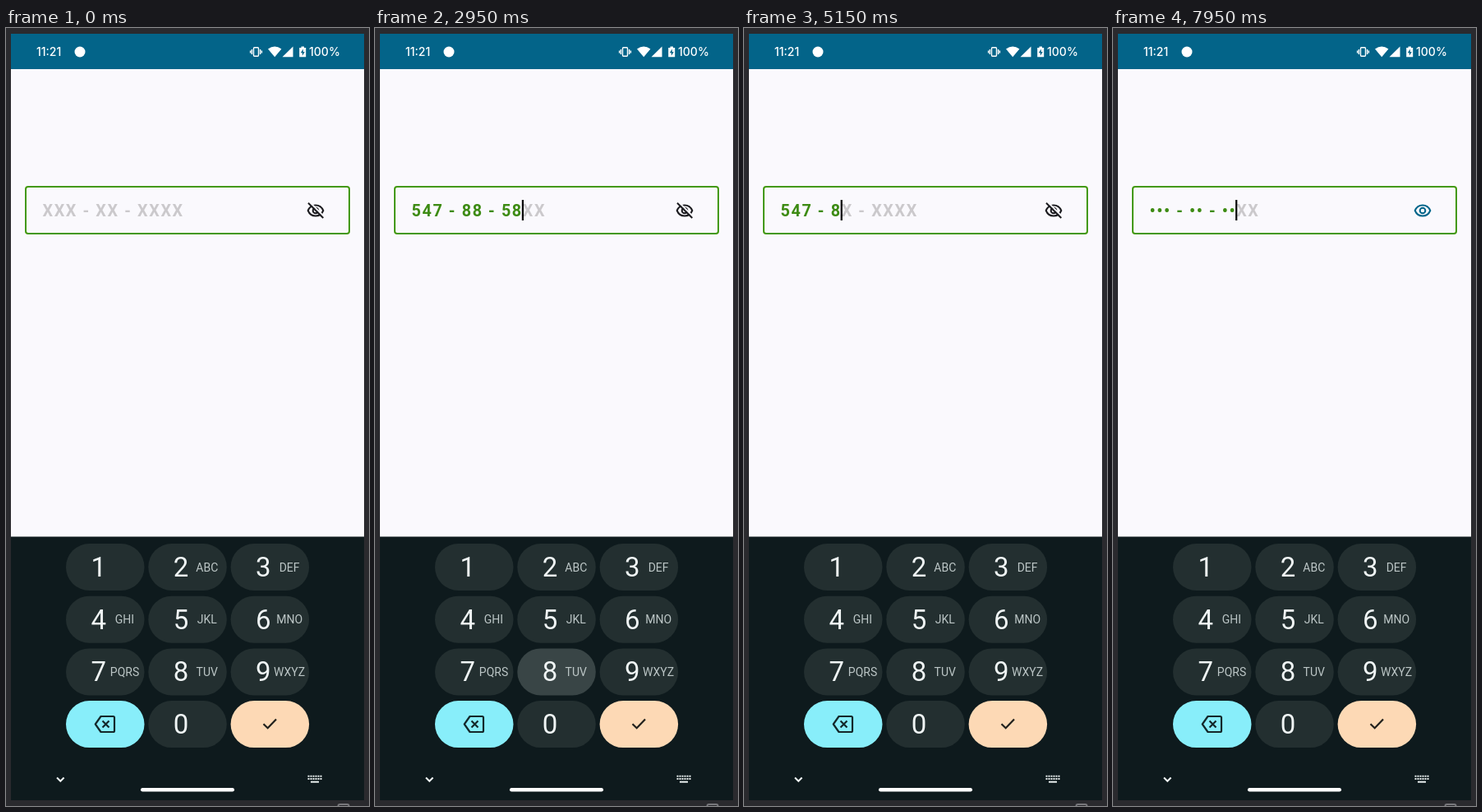
Recreate the animation shown at these times as an HTML page. Size 442 by 946 pixels, loop 8 s.

```html
<!DOCTYPE html>
<html lang="en">
<head>
<meta charset="utf-8">
<title>Masked number field</title>
<style>
  html, body { margin: 0; width: 100%; height: 100%; overflow: hidden; background: #2a2a2e; }
  svg { display: block; width: 442px; height: 946px; }
  text { font-family: Roboto, sans-serif; white-space: pre; }
  .status { font: 500 14px Inter, sans-serif; fill: #fff; }
  .field { font-size: 19.8px; font-weight: 700; letter-spacing: 1.6px; }
  .digit { font-size: 33px; fill: #f0f5f5; text-anchor: middle; }
  .letters { font-size: 14px; fill: #bcc6c6; text-anchor: middle; }
  .line { fill: none; stroke-width: 2; }
</style>
</head>
<body>
<svg viewBox="0 0 442 946">
  <rect width="442" height="946" fill="#2a2a2e"/>
  <rect x="6" y="7" width="430" height="43" fill="#036489"/>
  <rect x="6" y="50" width="430" height="569" fill="#faf9fd"/>
  <rect x="6" y="618.5" width="430" height="320.5" fill="#0e1a1d"/>
  <rect x="404.5" y="944" width="13" height="8" rx="2" class="line" stroke="#77777b"/>

  <text class="status" x="37" y="34">11:21</text>
  <circle cx="90" cy="29" r="6.5" fill="#fff"/>
  <g class="line" stroke="#fff" style="stroke-width:1.4">
    <rect x="301.5" y="23.7" width="6" height="10.6" rx="1"/>
    <path d="M299.4 26v6M309.6 26v6M297.6 27.5v3M311.4 27.5v3"/>
  </g>
  <path d="M319 25.5Q327.2 19.5 335.400 25.5L327.200 35.300ZM336.500 35.300L349.500 22.500V35.300Z" fill="#fff"/>
  <path d="M359.500 22.500h3.500v1.500h2.200v11.300h-8v-11.300h2.300z" fill="#fff"/>
  <path d="M361.800 25.500l-3 4.700h2v3.600l3-4.800h-2z" fill="#036489"/>
  <text class="status" x="369" y="34">100%</text>

  <rect x="24" y="193" width="394" height="57" rx="3" class="line" stroke="#43990f"/>
  <text class="field" x="44.500" y="229"><tspan id="typed" fill="#3d8b13"></tspan><tspan id="hint" fill="#cbc9cc"></tspan></text>
  <rect id="caret" y="209" width="2.200" height="25" fill="#000"/>

  <circle id="ripple" cx="377" cy="222" r="21" fill="#f1eff2"/>
  <g id="eye" class="line" transform="translate(377 222)">
    <path d="M-9.300 0C-7.600-4.100-4.200-6.500 0-6.500S7.600-4.100 9.300 0C7.600 4.100 4.200 6.500 0 6.500S-7.600 4.100-9.300 0Z"/>
    <circle r="3.300"/>
    <g id="slash">
      <path d="M-7.500-10.500L10.500 7.500" stroke="#faf9fd"/>
      <path d="M-9-9.300L9.300 9"/>
    </g>
  </g>

  <g id="keys"></g>
  <g class="line" stroke="#14282b" style="stroke-width:2.200">
    <path d="M115.500 837H130.500Q132 837 132 838.500V854.500Q132 856 130.500 856H115.500L108.800 846.500Z" stroke-linejoin="round"/>
    <path d="M117.500 842.500l8 8M125.500 842.500l-8 8"/>
    <path d="M313.500 846.300L318.700 851.300L329 840.500" stroke="#20201c"/>
  </g>
  <path d="M62 911.500l4.300 4.300l4.300-4.300" class="line" stroke="#f0f5f5"/>
  <path d="M367.500 909.700h17M367.500 913h17" class="line" stroke="#e8eeee" stroke-dasharray="2 1"/>
  <path d="M371 916.700h10" class="line" stroke="#e8eeee"/>
  <rect x="164" y="924" width="114" height="4.600" rx="2.300" fill="#fff"/>
</svg>
<script>
const LOOP = 8000;
const MASK = "XXX - XX - XXXX";
const DIGITS = "547885885";
const TYPED_X = 44.5;
const HIDE_AT = 6800;

// Commit times: digits added, then deleted, then added again.
const edits = [];
let size = 0;
const add = times => times.forEach(t => edits.push({ t, key: DIGITS[size], n: ++size }));
const remove = times => times.forEach(t => edits.push({ t, key: "del", n: --size }));
add([1200, 1450, 1800, 2150, 2400, 2680, 2920, 3200, 3450]);
remove([4250, 4430, 4610, 4830, 5040, 5240, 5450]);
add([6400, 7230, 7430, 7640, 7850]);

const $ = id => document.getElementById(id);
const make = (tag, attrs, label = "") => {
  const el = document.createElementNS("http://www.w3.org/2000/svg", tag);
  for (const name in attrs) el.setAttribute(name, attrs[name]);
  el.textContent = label;
  return $("keys").appendChild(el);
};

const layout = [
  ["1", ""], ["2", "ABC"], ["3", "DEF"],
  ["4", "GHI"], ["5", "JKL"], ["6", "MNO"],
  ["7", "PQRS"], ["8", "TUV"], ["9", "WXYZ"],
  ["del", ""], ["0", ""], ["ok", ""]
];
const base = { del: "#88eefa", ok: "#fdd9b5" };
const pads = {};
layout.forEach(([key, letters], i) => {
  const x = 73 + (i % 3) * 100.3;
  const y = 627 + Math.floor(i / 3) * 63.7;
  pads[key] = make("rect", { x, y, width: 95.5, height: 57, rx: 28.5 });
  if (base[key]) return;
  make("text", { class: "digit", x: x + 39.700, y: y + 40 }, key);
  make("text", { class: "letters", x: x + 71.5, y: y + 33.5 }, letters);
});

const ramp = (t, from, to) => Math.min(1, Math.max(0, (t - from) / (to - from)));

// A separator turns green only once a digit follows it.
function split(n) {
  let end = 0;
  for (let seen = 0; seen < n; end++) if (MASK[end] === "X") seen++;
  return end;
}

function render(t) {
  let n = 0, last = -600;
  for (const e of edits) if (e.t <= t) { n = e.n; last = e.t; }
  const hidden = t >= HIDE_AT;
  const end = split(n);
  let i = 0;
  $("typed").textContent = MASK.slice(0, end).replace(/X/g, () => hidden ? (i++, "•") : DIGITS[i++]);
  $("hint").textContent = MASK.slice(end);

  const width = end ? $("typed").getComputedTextLength() : 0;
  $("caret").setAttribute("x", TYPED_X + width - 1);
  $("caret").setAttribute("visibility", (t - last) % 1000 < 500 ? "visible" : "hidden");

  $("eye").setAttribute("stroke", hidden ? "#00658a" : "#1b1b1f");
  $("slash").setAttribute("visibility", hidden ? "hidden" : "visible");
  $("ripple").setAttribute("opacity", ramp(t, 6700, 6800) * (1 - ramp(t, 7070, 7250)));

  const press = edits.find(e => t >= e.t - 40 && t < e.t + 70);
  for (const key in pads) {
    const down = press && press.key === key;
    const fill = down ? (key === "del" ? "#ec9a48" : "#394546") : base[key] || "#232f30";
    pads[key].setAttribute("fill", fill);
  }
}

const start = performance.now();
function frame() {
  render((performance.now() - start) % LOOP);
  requestAnimationFrame(frame);
}
frame();
</script>
</body>
</html>
```
